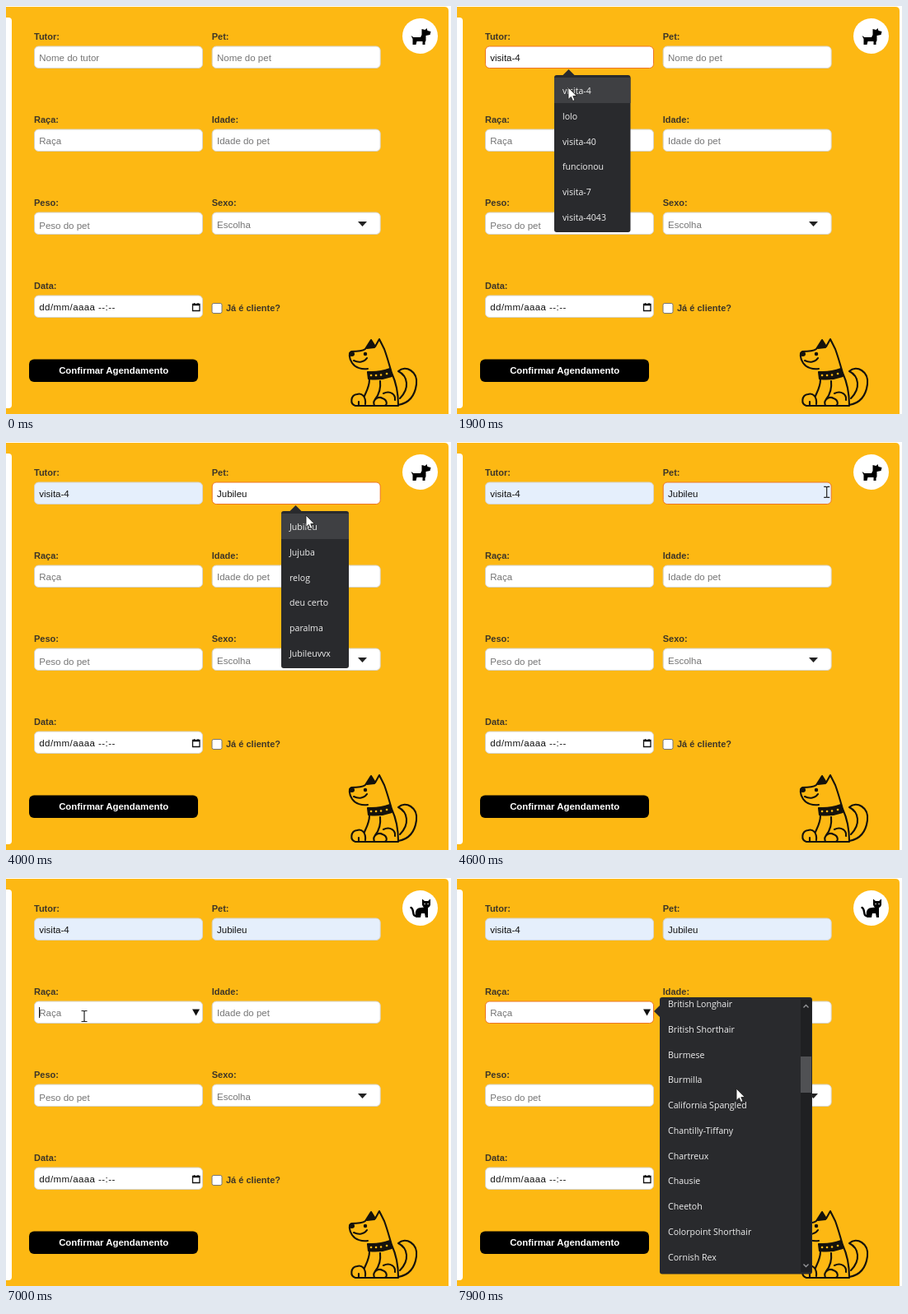
These frames come from a looping animation (540x496 px, 8000 ms). An HTML page:

```html
<!DOCTYPE html>
<html lang="pt-BR">
<head>
<meta charset="utf-8">
<title>Agendamento</title>
<style>
html, body { margin: 0; width: 100%; height: 100%; overflow: hidden; background: #fff; }
svg { display: block; }
text { font: 11.5px "Liberation Sans", Arial, sans-serif; fill: #757575; white-space: pre; }
.label { font-weight: bold; font-size: 11px; fill: #3d3528; }
.value { fill: #111; }
.menu text { font: 10.6px "Open Sans", "Noto Sans", sans-serif; fill: #f0f0f0; }
.line { fill: none; stroke: #15120c; stroke-width: 2.1; stroke-linejoin: round; stroke-linecap: round; }
</style>
</head>
<body>
<svg id="stage" width="540" height="496" viewBox="0 0 540 496">
  <defs>
    <clipPath id="listClip"><rect x="246" y="148" width="171" height="331"/></clipPath>
  </defs>
  <path d="M0 1H532Q537 1 537 6V496H0z" fill="#fdb813"/>
  <path d="M0 14H3Q7 14 7 18V485Q7 489 3 489H0z" fill="#fff"/>

  <g id="form"></g>
  <path d="M427 262h11l-5.5 6z" fill="#222"/>
  <path id="raceArrow" d="M226 159.5h9l-4.5 8z" fill="#111"/>
  <path d="M226.500 362.500h8.500v8h-8.500zM226.500 363.500h8.500M228.500 361v2M233 361v2" fill="none" stroke="#111" stroke-width="1.300"/>
  <rect x="250" y="361.500" width="12" height="12" rx="2" fill="#fff" stroke="#767676"/>
  <text class="label" x="267" y="371">Já é cliente?</text>
  <rect x="28" y="429.500" width="205" height="27.500" rx="6"/>
  <text x="130.700" y="446.500" text-anchor="middle" style="font-weight:bold;font-size:11.400px;fill:#fff">Confirmar Agendamento</text>

  <g class="line">
    <path d="M476 444C485 436 500 444 498 460C496 475 488 483 476 485M476 444C488 450 490 465 478 477"/>
    <path d="M439 441C432 442 424 440 420 434C416 428 416 422 419 420C425 420 432 420 436 417L443 406L448 414L453 405L459 417C463 428 465 436 468 446C474 459 476 470 476 485"/>
    <path d="M441 454C441 463 437 469 435 474M454 456C455 465 452 473 448 478M458 471C466 467 473 472 472 479"/>
    <path d="M447 486H424C417 484 418 473 426 472C432 470 437 475 436 484M428 486v-5M447 486C444 478 452 474 457 477C463 479 463 486 459 486zM459 486H476M422 431C428 434 435 433 438 428"/>
    <path d="M438 416L443 407L447 415z" fill="#15120c"/>
    <path d="M439 445Q453 446 466 441L468 450Q454 455 440 453z" fill="#15120c"/>
    <ellipse cx="419.500" cy="423" rx="2.500" ry="2" fill="#15120c"/>
    <circle cx="436" cy="423" r="1.200" fill="#15120c"/>
  </g>
  <path d="M443 449h.1M449 449h.1M455 448.500h.1M462 447h.1" stroke="#fdb813" stroke-width="2.600" stroke-linecap="round"/>

  <circle cx="502.500" cy="36.500" r="21.500" fill="#fff"/>
  <path id="dogIcon" d="M491.500 36l3 2h8.500l1.500-3v-7l4 1 2-2 1 3 4 1-1 4-5 1v6l-1 2v3h-3v-4h-7l-1 4h-4v-7z"/>
  <g id="catIcon">
    <path d="M498 46C492 47 496 38 491.500 36" fill="none" stroke="#000" stroke-width="2.400" stroke-linecap="round"/>
    <path d="M497 47c-1-7 1-11 7-11l8-1v13h-3l-1-5h-4l-1 5h-6zM505 25.500l3 2.500h4l3-2.500v7q-1 4-5 4t-5-4z"/>
    <path d="M508 31.500h.1M512 31.500h.1" stroke="#fff" stroke-width="1.400" stroke-linecap="round"/>
  </g>

  <g id="tutorMenu" class="menu"></g>
  <g id="petMenu" class="menu"></g>
  <g id="raceMenu" class="menu">
    <path d="M239 162l8-8v16z" fill="#292a2d"/>
    <rect x="246" y="145" width="185" height="336.500" rx="3" fill="#292a2d"/>
    <g clip-path="url(#listClip)"><g id="races"></g></g>
    <rect x="417" y="148" width="13" height="331" fill="#1f2022"/>
    <rect id="thumb" x="417" width="13" height="44" fill="#505154"/>
    <path d="M420.500 157.500l3-3 3 3M420.500 469.500l3 3 3-3" fill="none" stroke="#96979a" stroke-width="1.300"/>
  </g>

  <path id="caret" stroke="#111"/>
  <g id="cursor">
    <path id="arrow" d="M0 0V14.500L3.400 11.400L5.600 16.500L8 15.400L5.800 10.500H10.300z" fill="#fff" stroke="#222" stroke-width=".9"/>
    <path id="beam" d="M-3.500-6.500H-1Q0-6.500 0-5.500Q0-6.500 1-6.500H3.500M0-5.500V5.500M-3.500 6.500H-1Q0 6.500 0 5.500Q0 6.500 1 6.500H3.500" fill="none" stroke="#222" stroke-width="1.200"/>
    <path id="hand" d="M-1.500 1.500Q0-1 1.500 1.500V7Q3 5.500 4.300 7.500Q6 6.500 7 8.500Q9 8 9 10V14Q8 17 7 19H-1Q-3 15-5.500 11.500Q-5-9.500 11 -9.500 11Q-5 8-1.500 12z" fill="#fff" stroke="#222"/>
  </g>
</svg>
<script>
const $ = id => document.getElementById(id);
const LOOP = 8000, PITCH = 30.77;
const show = (id, on) => $(id).setAttribute("display", on ? "inline" : "none");
const text = (x, y, s, attrs = "") => `<text x="${x}" y="${y}" ${attrs}>${s}</text>`;

$("hand").setAttribute("d", "M-1.500 1.500Q0-1 1.500 1.500V7Q3 5.500 4.300 7.500Q6 6.500 7 8.500Q9 8 9 10V14Q8 17 7 19H-1Q-3 15-5.500 11.500Q-4.500 9-1.500 12z");

// id, label, placeholder, column, row
const fields = [
  ["tutor", "Tutor:", "Nome do tutor", 0, 0], ["pet", "Pet:", "Nome do pet", 1, 0],
  ["race", "Raça:", "Raça", 0, 1], ["age", "Idade:", "Idade do pet", 1, 1],
  ["weight", "Peso:", "Peso do pet", 0, 2], ["sex", "Sexo:", "Escolha", 1, 2],
  ["date", "Data:", "dd/mm/aaaa --:--", 0, 3],
];
const fieldX = col => 34 + col * 215.7;
const fieldY = row => 49 + row * 101;
$("form").innerHTML = fields.map(([id, label, hint, col, row]) => {
  const x = fieldX(col), y = fieldY(row);
  const base = y + (id == "weight" ? 20 : id == "sex" ? 19 : 17.5);
  return text(x, y - 8.500, label, 'class="label"') +
    `<rect id="${id}Box" x="${x + .5}" y="${y}" width="204" height="26.500" rx="5" fill="#fff" stroke="#d6d2c8"/>` +
    text(x + 6.300, base, hint, `id="${id}Text"` + (id == "date" ? ' class="value" letter-spacing=".42"' : ""));
}).join("");

function buildMenu(id, x, width, items) {
  const tip = x + 17.500;
  $(id).innerHTML =
    `<path d="M${tip - 8} 85l8-8 8 8z" fill="#292a2d"/>` +
    `<rect x="${x}" y="84" width="${width}" height="191" rx="3" fill="#292a2d"/>` +
    `<rect id="${id}Hover" x="${x}" y="87" width="${width}" height="31" fill="#3f4043"/>` +
    items.map((s, i) => text(x + 10, 107 + i * PITCH, s)).join("");
}
const owner = "visita-4", petName = "Jubileu";
buildMenu("tutorMenu", 118, 92.500, [owner, "lolo", "visita-40", "funcionou", "visita-7", "visita-4043"]);
buildMenu("petMenu", 334, 82, [petName, "Jujuba", "relog", "deu certo", "paralma", "Jubileuvvx"]);

const races = ("Abyssinian,Aegean,American Bobtail,American Curl,American Shorthair,American Wirehair," +
  "Arabian Mau,Australian Mist,Balinese,Bambino,Bengal,Birman,Bombay,British Longhair,British Shorthair," +
  "Burmese,Burmilla,California Spangled,Chantilly-Tiffany,Chartreux,Chausie,Cheetoh,Colorpoint Shorthair," +
  "Cornish Rex,Cymric").split(",");
$("races").innerHTML = races.map((s, i) => text(256, 168 + i * PITCH, s)).join("");

// pointer path: time, x, y
const path = [
  [100, 150, 430], [900, 56, 67], [1400, 56, 67], [1900, 135, 99], [2200, 136, 98],
  [2500, 250, 75], [2900, 300, 66], [3200, 300, 66], [4000, 364, 89], [4200, 365, 90],
  [4900, 503, 42], [5700, 506, 41], [5900, 506, 41], [6700, 95, 168], [7100, 95, 168],
  [7600, 339, 256], [LOOP, 339, 256],
];
const ramp = (t, a, b) => {
  const p = Math.min(1, Math.max(0, (t - a) / (b - a)));
  return p * p * (3 - 2 * p);
};
function pointer(t) {
  const i = Math.max(1, path.findIndex(k => k[0] > t));
  const [t0, x0, y0] = path[i - 1], [t1, x1, y1] = path[i];
  const p = ramp(t, t0, t1);
  return [x0 + (x1 - x0) * p, y0 + (y1 - y0) * p];
}
const overField = (x, y) => fields.some(([id, , , col, row]) => id != "sex" &&
  x > fieldX(col) + 1 && x < fieldX(col) + 205 && y > fieldY(row) && y < fieldY(row) + 27);

function setField(id, hint, value, filled, focused) {
  const box = $(id + "Box"), label = $(id + "Text");
  box.setAttribute("fill", filled ? "#e5effc" : "#fff");
  box.setAttribute("stroke", focused ? "#ec7426" : "#d6d2c8");
  label.textContent = value || hint;
  label.setAttribute("class", value ? "value" : "");
}

function draw(t) {
  const between = (a, b) => t >= a && t < b;
  const tutorOpen = between(1500, 2300), petOpen = between(3300, 4200), raceOpen = t >= 7100;
  setField("tutor", "Nome do tutor", t >= 1800 && owner, t >= 2300, between(1400, 3200));
  setField("pet", "Nome do pet", t >= 3700 && petName, t >= 4200, between(3200, 5300));
  setField("race", "Raça", "", false, t >= 7100);
  show("tutorMenu", tutorOpen);
  show("tutorMenuHover", t >= 1800);
  show("petMenu", petOpen);
  show("petMenuHover", t >= 3700);
  show("raceMenu", raceOpen);
  show("raceArrow", t >= 6600);
  show("dogIcon", t < 5300);
  show("catIcon", t >= 5300);

  const scroll = 411 * ramp(t, 7300, 7800);
  $("races").setAttribute("transform", `translate(0 ${-scroll})`);
  $("thumb").setAttribute("y", 165 + scroll * .1265);

  // blinking caret at the end of the focused value
  const spot = between(1400, 3200) ? [t < 1800 ? 40.500 : "tutor", 56] :
    between(3200, 5300) ? [t < 3700 ? 256.500 : "pet", 56] : between(7000, 7400) ? [40.500, 157] : null;
  const previewing = tutorOpen && t >= 1800 || petOpen && t >= 3700;
  const lit = spot && !previewing && t % 1000 < 600;
  show("caret", lit);
  if (lit) {
    const [at, y] = spot;
    const x = at.toFixed ? at : fieldX(at == "pet" ? 1 : 0) + 7 + $(at + "Text").getComputedTextLength();
    $("caret").setAttribute("d", `M${x} ${y}v13`);
  }

  const [x, y] = pointer(t);
  const hand = Math.hypot(x - 502.5, y - 36.5) < 21.5;
  const beam = !hand && !raceOpen && overField(x, y);
  show("cursor", t >= 100);
  show("hand", hand);
  show("beam", beam);
  show("arrow", !hand && !beam);
  $("cursor").setAttribute("transform", `translate(${x} ${y})`);
}

const start = performance.now();
(function frame() {
  const t = (performance.now() - start) % LOOP;
  draw(Math.floor(t / 100) * 100);
  requestAnimationFrame(frame);
})();
</script>
</body>
</html>
```
